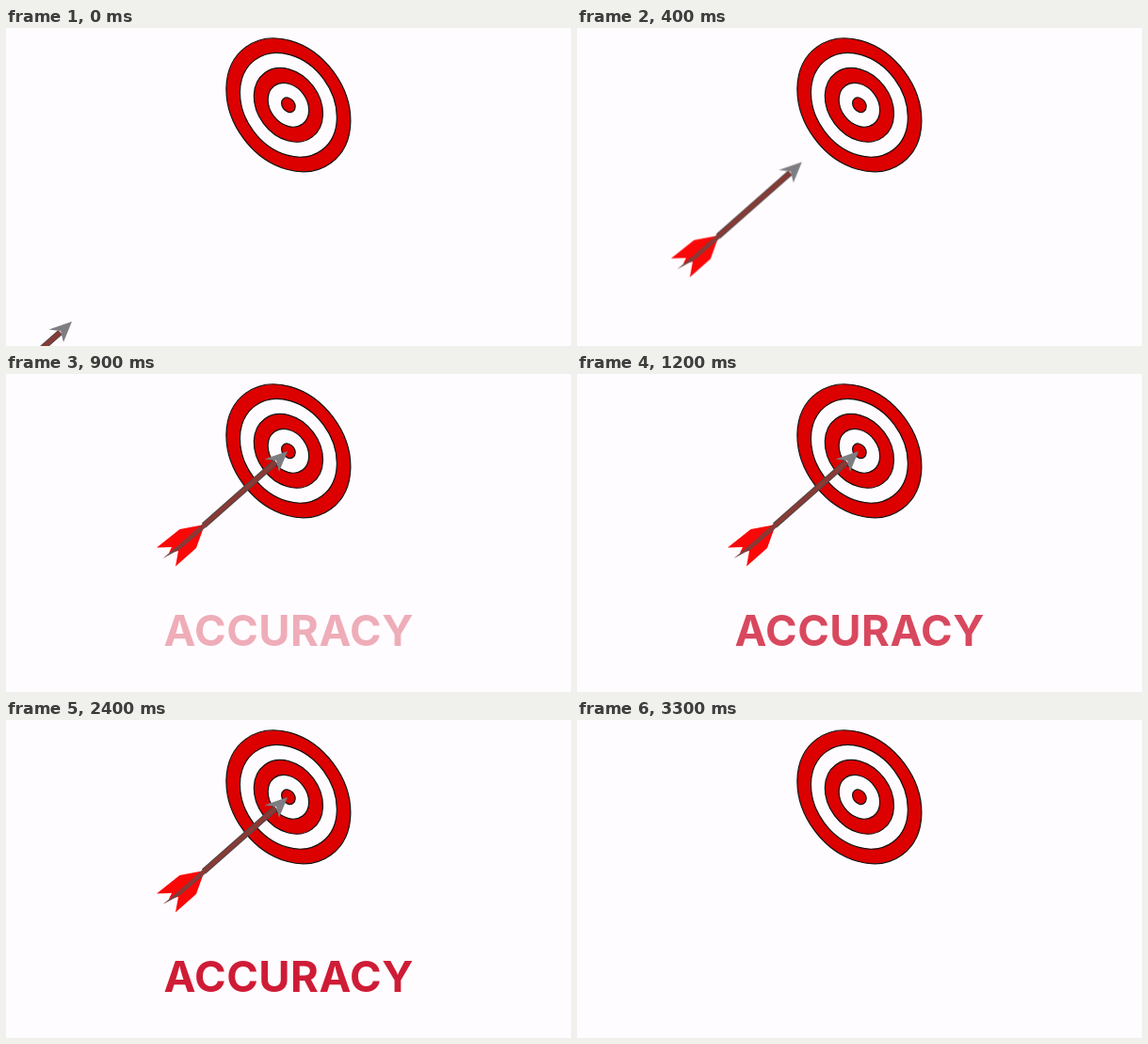
Recreate the animation shown at these times as an HTML page. Size 600 px wide and 338 px high, loop 3400 ms.

```html
<!DOCTYPE html>
<html lang="en">
<head>
<meta charset="utf-8">
<title>Accuracy</title>
<style>
  html, body {
    margin: 0;
    width: 100%;
    height: 100%;
    overflow: hidden;
    background: #fffcff;
  }
  svg { display: block; width: 100%; height: 100%; }

  .ring { stroke: #111; stroke-width: 1.2; }
  .red { fill: #dc0000; }
  .white { fill: #fffcff; }

  .scene, .arrow, .word { animation: 3400ms infinite step-end; }
  .scene { animation-name: vanish; }
  .arrow { animation-name: fly; }
  .word {
    animation-name: fade;
    fill: #cf1c36;
    font: 700 45.5px Inter, "Open Sans", sans-serif;
    letter-spacing: .5px;
    text-anchor: middle;
  }

  @keyframes vanish {
    0% { visibility: visible; }
    97.059%, 100% { visibility: hidden; }
  }
  /* Ten pictures a second: steady flight, then a dead stop. */
  @keyframes fly {
    0% { transform: translate(-229px, 230px); animation-timing-function: steps(5); }
    14.706% { transform: translate(-18px, 18px); }
    17.647%, 100% { transform: none; }
  }
  @keyframes fade {
    0% { opacity: 0; }
    20.588% { opacity: .05; animation-timing-function: steps(6); }
    38.235% { opacity: .95; }
    41.176%, 100% { opacity: 1; }
  }
</style>
</head>
<body>
<svg viewBox="0 0 600 338">
  <g class="ring" transform="translate(299.9 81.8) rotate(53.5)">
    <ellipse class="red" rx="76.4" ry="59.5"/>
    <ellipse class="white" rx="59.6" ry="46.4"/>
    <ellipse class="red" rx="42.4" ry="33"/>
    <ellipse class="white" rx="25.2" ry="19.6"/>
    <ellipse class="red" rx="8.4" ry="6.6"/>
  </g>
  <g class="scene">
    <g class="arrow">
      <g transform="translate(299 82)">
        <path fill="#fa0808" d="M-88 78L-114.5 83L-139 102.5L-123 102L-126 108L-116 106L-119 122.5L-97 103Z"/>
        <path fill="#74413f" d="M-90 77L-117 101L-132.5 114L-114 104L-87 81Z"/>
        <path fill="none" stroke="#574648" stroke-width="6.4" d="M-12.5 11.5L-89 79"/>
        <path fill="none" stroke="#8a3a34" stroke-width="4.2" d="M-12.5 11.5L-89 79"/>
        <path fill="none" stroke="#a8302c" stroke-width="1.6" d="M-89 79L-117 103"/>
        <path fill="#7d7d82" d="M0 0L-24.5 8.5L-12 10L-9 22Z"/>
      </g>
    </g>
    <text class="word" x="300.2" y="288.9">ACCURACY</text>
  </g>
</svg>
</body>
</html>
```
